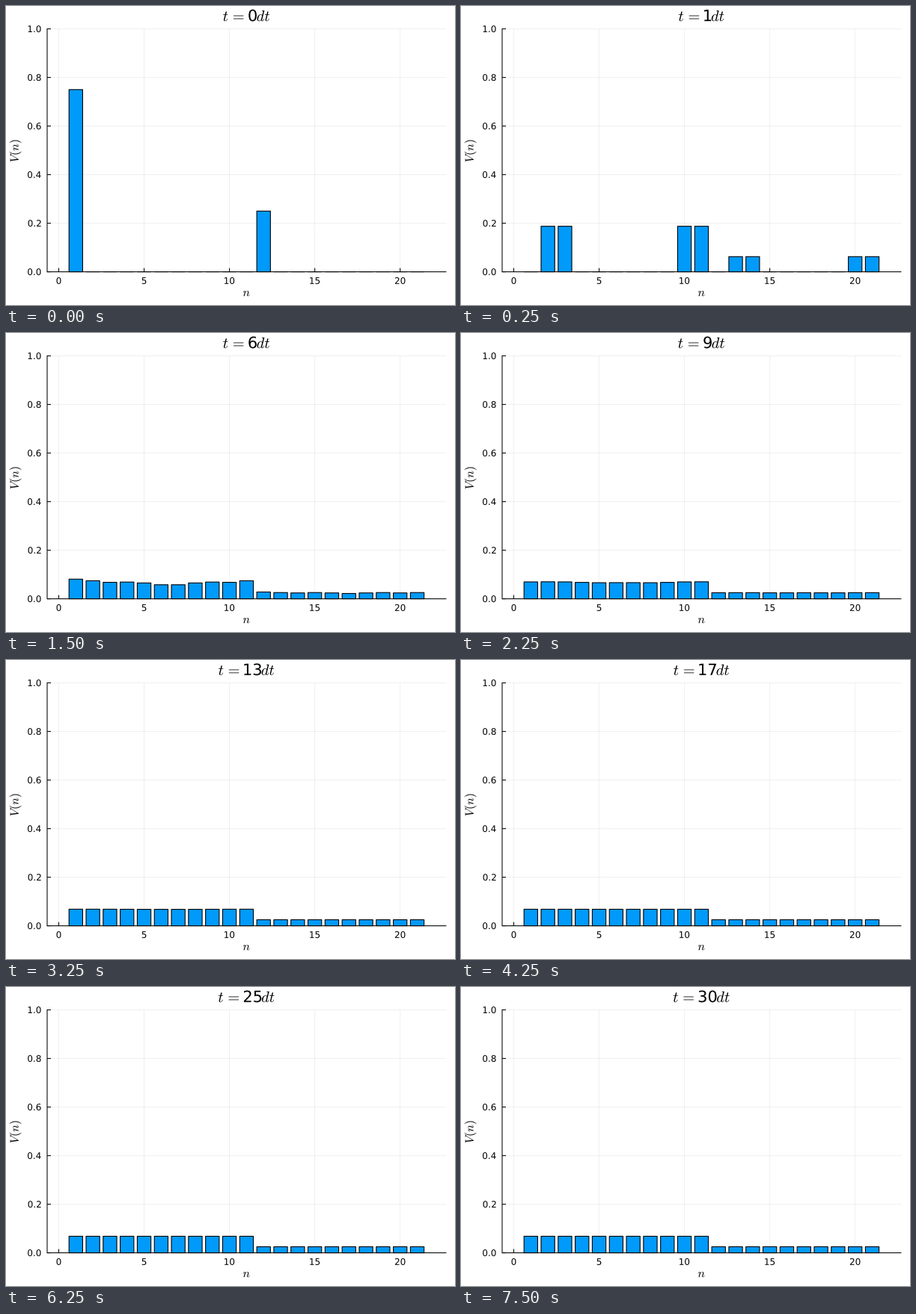
Recreate the animation shown at these times as a matplotlib script. Size 600 by 400 pixels, loop 7.75 s.

```python
import numpy as np
import matplotlib.pyplot as plt
from matplotlib.animation import FuncAnimation
from matplotlib.patches import PathPatch, Rectangle
from matplotlib.path import Path
from matplotlib.textpath import TextPath
from matplotlib.transforms import Affine2D

W, H, DPI = 600, 400, 100
STEPS, INTERVAL = 31, 250
LEFT, RIGHT, TOP, BASE = 55.0, 588.4, 30.6, 355.6
X0, DX = 70.5, 22.81
PX = 72 / DPI

TICK_EM, LABEL_EM, TITLE_EM, DIGIT_EM = 12, 16, 20.4, 21
TITLE_X, TITLE_Y = 321.3, 20.2

plt.rcParams["mathtext.fontset"] = "cm"
plt.rcParams["path.snap"] = False


def px(n):
    return X0 + DX * n


def py(v):
    return BASE - (BASE - TOP) * v


def glyphs(s, em, x, y, anchor=0.0, angle=0):
    """Outline of s with its ink anchored at x and its baseline at y."""
    path = TextPath((0, 0), s, size=em, prop={"family": "DejaVu Sans"})
    box = path.get_extents()
    move = Affine2D().translate(-box.x0 - anchor * box.width, 0)
    return move.scale(1, -1).rotate_deg(angle).translate(x, y).transform_path(path)


def add_text(*args, **kwargs):
    patch = PathPatch(glyphs(*args, **kwargs), fc="black", lw=0, zorder=5)
    return ax.add_patch(patch)


def add_line(xs, ys, alpha=1.0, zorder=2):
    ax.plot(xs, ys, color="black", lw=1.05 * PX, alpha=alpha, zorder=zorder,
            solid_capstyle="butt")


def title_path(step):
    em = TITLE_EM
    digits = glyphs(str(step), DIGIT_EM, 0, TITLE_Y)
    width = digits.get_extents().width
    start = TITLE_X - (2.576 * em + width) / 2
    number_x = start + 1.695 * em
    return Path.make_compound_path(
        glyphs("$t$", em, start + 0.02 * em, TITLE_Y),
        glyphs("$=$", em, start + 0.695 * em, TITLE_Y),
        Affine2D().translate(number_x, 0).transform_path(digits),
        glyphs("$dt$", em, number_x + width + 0.03 * em, TITLE_Y),
    )


def spread(ring):
    """Each site shares its value equally among its four nearest sites."""
    return sum(np.roll(ring, k) for k in (-2, -1, 1, 2)) / 4


def simulate():
    big, small = np.zeros(11), np.zeros(10)
    big[0], small[0] = 0.75, 0.25
    states = []
    for _ in range(STEPS):
        states.append(np.concatenate([big, small]))
        big, small = spread(big), spread(small)
    return states


fig = plt.figure(figsize=(W / DPI, H / DPI), dpi=DPI, facecolor="white")
ax = fig.add_axes([0, 0, 1, 1])
ax.set_xlim(0, W)
ax.set_ylim(H, 0)
ax.set_autoscale_on(False)
ax.axis("off")

for n in range(0, 21, 5):
    x = px(n)
    add_line([x, x], [TOP, BASE], alpha=0.06, zorder=1)
    add_line([x, x], [BASE, BASE - 5])
    add_text(str(n), TICK_EM, x, 371.8, anchor=0.5)

for v in np.arange(6) / 5:
    y = py(v)
    add_line([LEFT, RIGHT], [y, y], alpha=0.06, zorder=1)
    add_line([LEFT, LEFT + 5], [y, y])
    add_text(f"{v:.1f}", TICK_EM, 46.6, y + 4.4, anchor=1)

add_line([LEFT, RIGHT], [BASE, BASE])
add_line([LEFT, LEFT], [BASE + 0.5, TOP - 0.5])
add_text("$n$", LABEL_EM, 321.2, 388.2, anchor=0.5)
add_text("$V(n)$", LABEL_EM, 16.6, 194, anchor=0.5, angle=-90)

states = simulate()
bars = [
    ax.add_patch(Rectangle((px(n - 0.4), BASE), 0.8 * DX, 0, fc="#009AFA",
                           ec="black", lw=1.1 * PX, joinstyle="round", zorder=3))
    for n in range(1, 22)
]
title = ax.add_patch(PathPatch(title_path(0), fc="black", lw=0, zorder=5))


def update(step):
    for bar, v in zip(bars, states[step]):
        bar.set_y(py(v))
        bar.set_height(BASE - py(v))
    title.set_path(title_path(step))
    return [*bars, title]


anim = FuncAnimation(fig, update, frames=STEPS, interval=INTERVAL,
                     repeat=True, repeat_delay=0)
plt.show()
```
